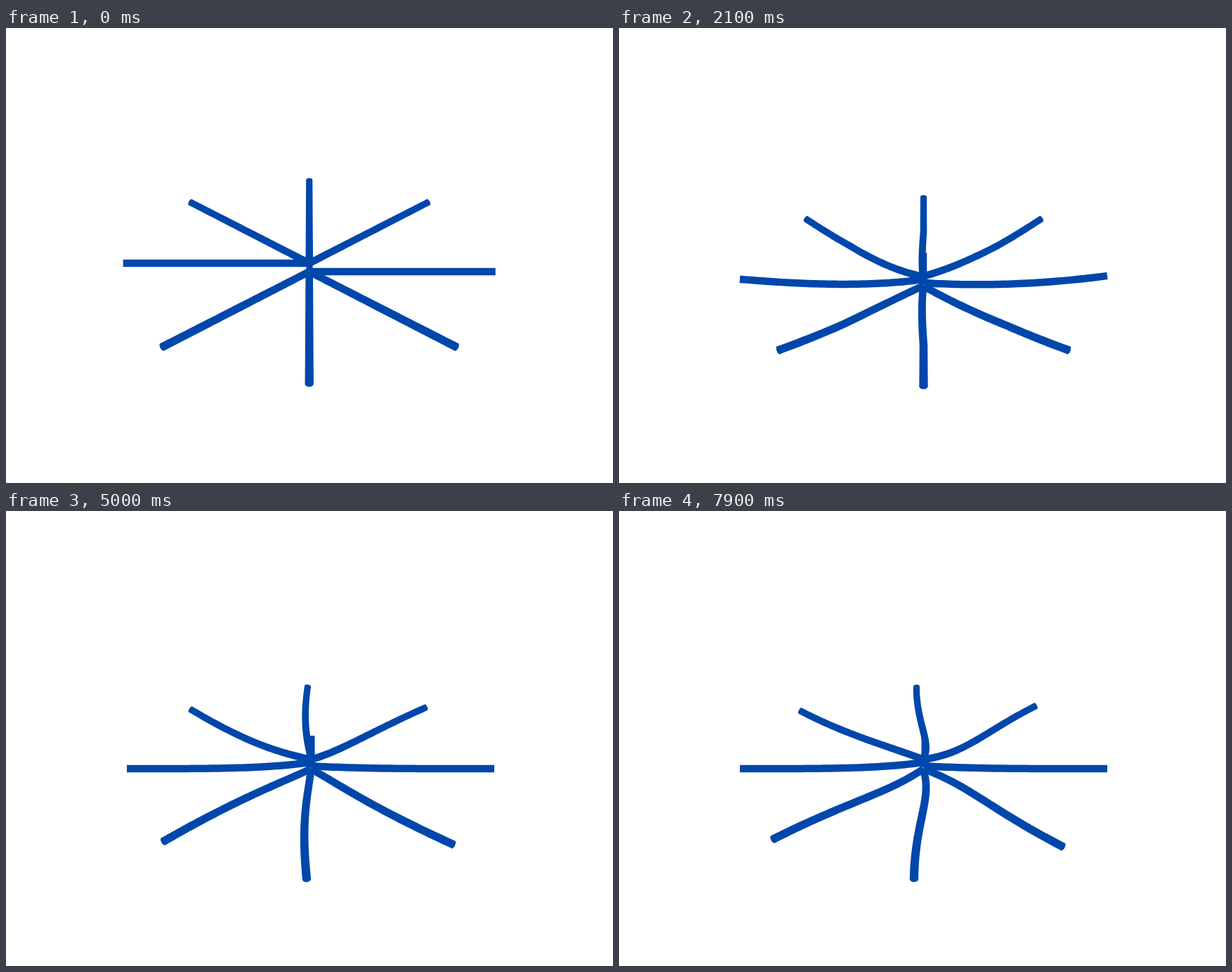
Recreate the animation shown at these times as an HTML page with a canvas. Size 864 px wide and 648 px high, loop 8000 ms.

```html
<!DOCTYPE html>
<html>
<head>
<meta charset="utf-8">
<style>
  html, body { margin: 0; width: 100%; height: 100%; overflow: hidden; background: #fff; }
  canvas { display: block; }
</style>
</head>
<body>
<canvas id="stage" width="864" height="648"></canvas>
<script>
const ctx = document.getElementById('stage').getContext('2d');
ctx.fillStyle = '#0047ab';

const LOOP = 8000, STEP = 100;
const FLOOR = 367;              // screen height of the floor under the hub
const REACH = 265, TILT = .513, DEPTH = .15;
const GRAVITY = 11.3, KICK = 27;
const THICK = 10.5, SEGMENTS = 48;

const clamp = u => Math.max(0, Math.min(1, u));
const smooth = u => (u = clamp(u), u * u * (3 - 2 * u));
const fallen = t => GRAVITY * t * t;

// Height of a free tip: one fall, one bounce, then rest.
function tipHeight(drop, t) {
  const landing = Math.sqrt(drop / GRAVITY), after = t - landing;
  return Math.max(0, after < 0 ? drop - fallen(t) : KICK * after - fallen(after));
}

// Sideways roll that travels slowly from the hub out to the tip.
function sway(f, t) {
  const wait = 1.2 + 2.5 * f * f, half = 3.8 + 6.4 * f;
  return 12 * f ** .65 * Math.sin(Math.PI * Math.max(0, t - wait) / half);
}

// Eight arms on a circle; the front half starts lower than the back half.
function makeArm(k, t) {
  const angle = k * Math.PI / 4, X = Math.cos(angle), Z = Math.sin(angle);
  const side = k < 4 ? 1 : -1;
  const drop = 26 - 6 * side;
  const root = Math.max(drop - fallen(t), 6.5 - 2.5 * side - 6 * Z);
  const tip = tipHeight(drop, t);
  const give = clamp(t / 1.2) ** 2, slack = smooth((t - 1) / .8);
  const reach = REACH - 3.5 * give;
  const bump = 78 * Math.cos(4 * angle) * Math.exp(-(((t - 1.25) / .35) ** 2));

  const point = f => {
    const roll = sway(f, t);
    const x = X * reach * f - Math.abs(Z) * roll;
    const z = Z * reach * f + Math.round(Z) * X * roll;
    const scale = 1 / (1 - DEPTH * z / REACH);
    const height = root * (1 - f) ** (1 + 3 * slack) + tip * f ** (1 + 1.5 * slack)
                 + bump * f * (1 - f) ** 3;
    return {
      x: 431.7 + 1.8 * give + x * scale,
      y: FLOOR + z * scale * TILT - height,
      r: THICK / 2 * scale
    };
  };
  return { point, cap: .65 * Math.abs(Z) };
}

function drawArm({ point, cap }) {
  const left = [], right = [];
  let end, heading;
  for (let i = 0; i <= SEGMENTS; i++) {
    const f = i / SEGMENTS;
    const a = point(Math.max(0, f - .01)), b = point(Math.min(1, f + .01));
    end = point(f);
    heading = Math.atan2(b.y - a.y, b.x - a.x);
    const nx = -Math.sin(heading) * end.r, ny = Math.cos(heading) * end.r;
    left.push([end.x + nx, end.y + ny]);
    right.unshift([end.x - nx, end.y - ny]);
  }
  ctx.beginPath();
  for (const p of left.concat(right)) ctx.lineTo(...p);
  ctx.fill();
  ctx.beginPath();
  ctx.ellipse(end.x, end.y, end.r * cap, end.r, heading, 0, 2 * Math.PI);
  ctx.fill();
}

// Short upright peg at the hub.
function drawPeg(t) {
  const x = 432 + 3 * smooth((t - 1) / 2);
  const top = Math.min(301 + fallen(t), 320);
  ctx.fillRect(x - 4.5, top, 9, 45);
}

function draw(now) {
  const t = Math.floor(now % LOOP / STEP) * STEP / 1000;
  ctx.clearRect(0, 0, 864, 648);
  for (let k = 0; k < 8; k++) drawArm(makeArm(k, t));
  drawPeg(t);
}

const start = performance.now();
function frame() {
  draw(performance.now() - start);
  requestAnimationFrame(frame);
}
frame();
</script>
</body>
</html>
```
